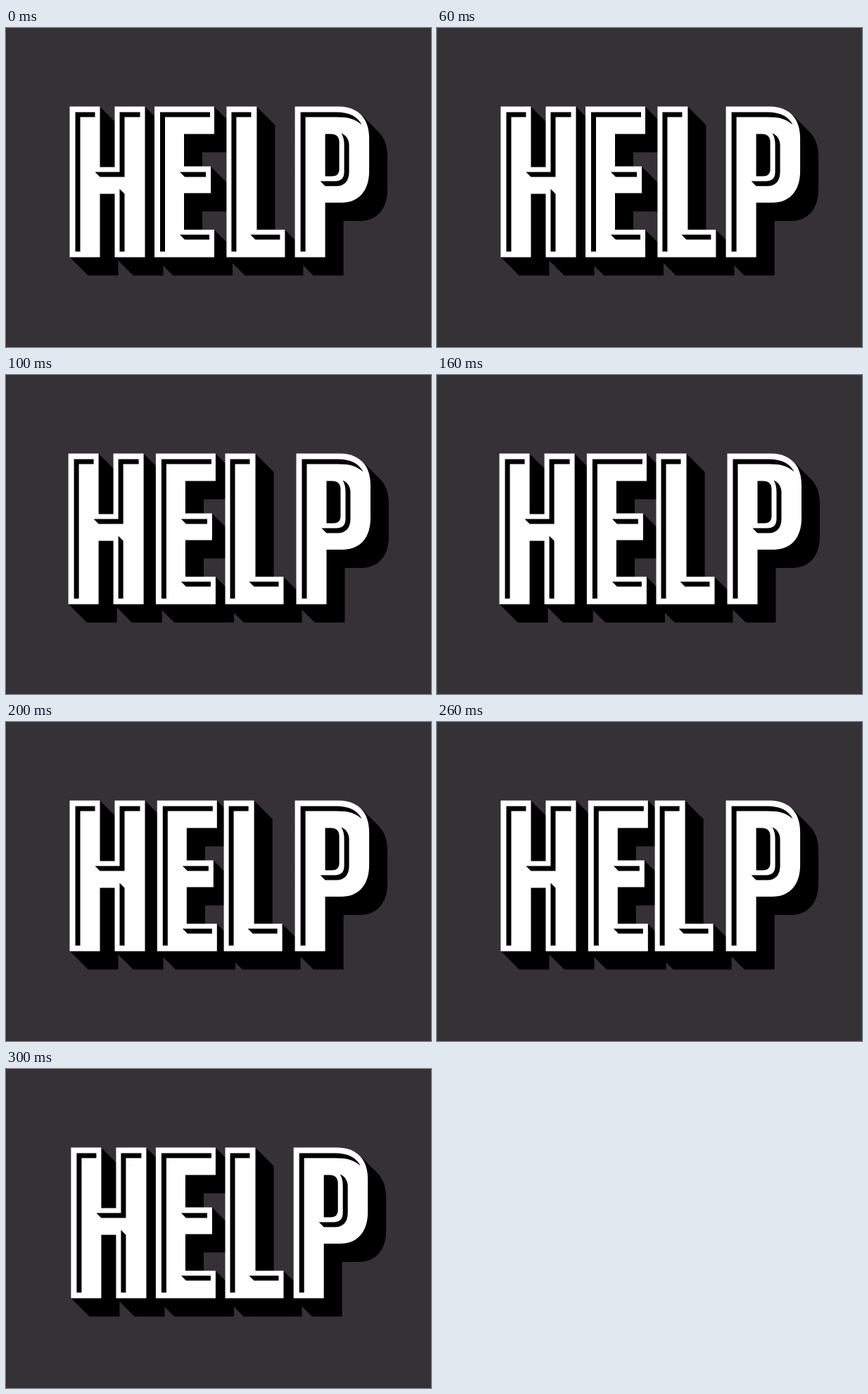
Write an HTML page that moves like this. It is 604 px wide and 453 px high and loops after 0.4 s.

```html
<!DOCTYPE html>
<html lang="en">
<head>
<meta charset="utf-8">
<title>HELP</title>
<style>
  html, body { margin: 0; width: 100%; height: 100%; overflow: hidden; background: #353235; }
  svg { display: block; width: 100%; height: 100%; }
</style>
</head>
<body>
<svg id="stage" viewBox="0 0 604 453" role="img" aria-label="HELP"></svg>
<script>
const NS = 'http://www.w3.org/2000/svg';
const stage = document.getElementById('stage');
const STEP = 100, STEPS = 4, SWING = 1.9, DEPTH = 26, TOP = 0.4;

// Each letter: resting x, outline, inner line, and horizontal sway by phase angle.
const letters = [
  {
    x: 0.5,
    face: 'M90 111h43v86h21v-86h43v214h-43v-90h-21v90h-43z',
    line: 'M98 119h28v7h-21v191h-7z M161 119h29v7h-22v85h-35l-7-7h35z M161 228l7 7v82h-7z',
    sway: a => -Math.sin(a)
  },
  {
    x: 0,
    face: 'M211 111h85v39h-43v46h38v38h-38v52h43v39h-85z',
    line: 'M219 119h71v7h-64v191h-7z M247 204h37v7h-30z M247 293h42v7h-35z',
    sway: a => 1 - Math.cos(a)
  },
  {
    x: 0.4,
    face: 'M313 111h43v175h40v39h-83z',
    line: 'M320 119h28v7h-21v191h-7z M347 293h42v7h-35z',
    sway: a => Math.cos(a) - 1
  },
  {
    x: -0.4,
    face: 'M411 111H473C501 111 516.5 128 516.5 156V203C516.5 230 502 247.5 478 247.5H454V325H411z' +
          'M454 150V210H464C471 210 474 206 474 200V162C474 154 470 150 462 150z',
    line: 'M419 119H470C488 119 500 125 506 137C497 129 488 126 470 126H426V317H419z' +
          'M477 149C484 152 488 158 488 166V204C488 217 481 224 470 224H454L447 217H468' +
          'C477 217 481 212 481 204V166C481 159 480 154 477 149z',
    sway: a => Math.sin(a)
  }
];

function add(parent, name, attrs = {}) {
  const el = document.createElementNS(NS, name);
  for (const key in attrs) el.setAttribute(key, attrs[key]);
  return parent.appendChild(el);
}

function build(letter) {
  letter.group = add(stage, 'g');
  const shape = { d: letter.face, 'fill-rule': 'evenodd' };
  for (let s = DEPTH; s > 0; s -= 0.5) {
    add(letter.group, 'path', { ...shape, transform: `translate(${s} ${s})` });
  }
  add(letter.group, 'path', { ...shape, fill: '#fff' });
  add(letter.group, 'path', { d: letter.line });
}

function draw(time) {
  const angle = Math.floor(time / STEP) % STEPS * 2 * Math.PI / STEPS;
  for (const { group, x, sway } of letters) {
    group.setAttribute('transform', `translate(${x + SWING * sway(angle)} ${TOP})`);
  }
}

letters.forEach(build);
const start = performance.now();
function tick() {
  draw(performance.now() - start);
  requestAnimationFrame(tick);
}
tick();
</script>
</body>
</html>
```
